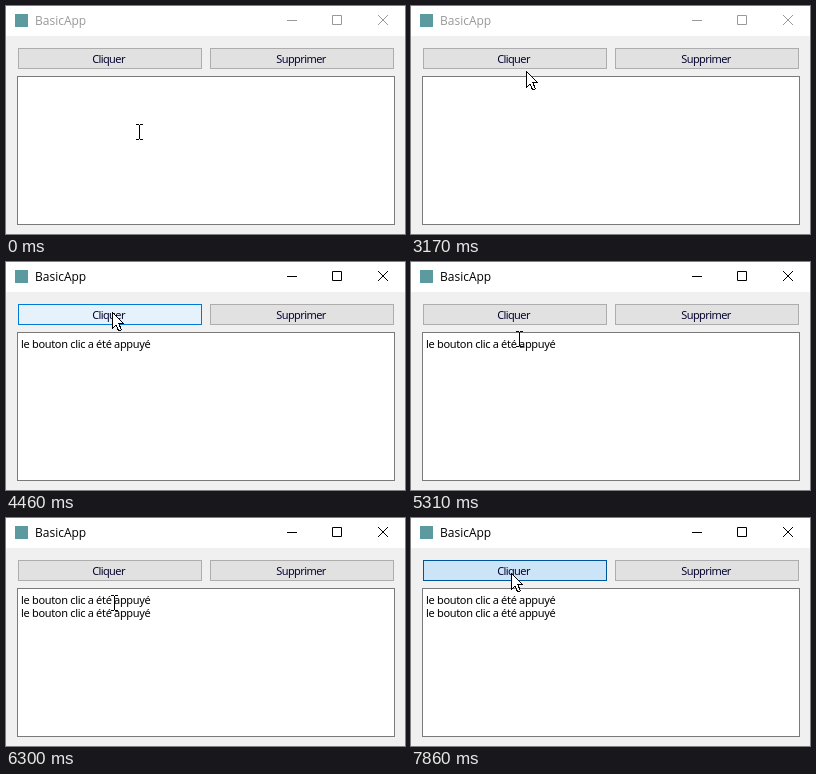
These frames come from a looping animation (399x228 px, 7990 ms). An HTML page:

```html
<!DOCTYPE html>
<html lang="fr">
<head>
<meta charset="utf-8">
<title>BasicApp</title>
<style>
  html, body { margin: 0; width: 100%; height: 100%; overflow: hidden; background: #f0f0f0; }
  svg { display: block; width: 399px; height: 228px; }
  text { font: 11px "Noto Sans", sans-serif; letter-spacing: -.32px; }
  .label { text-anchor: middle; letter-spacing: -.6px; fill: #060630; }
  #title { font: 12px "Open Sans", sans-serif; letter-spacing: 0; }
  .button { fill: #e1e1e1; stroke: #adadad; }
  .button.hover { fill: #e5f1fb; stroke: #0078d7; }
  .button.pressed { fill: #cce4f7; stroke: #005499; }
</style>
</head>
<body>
<svg viewBox="0 0 399 228">
  <rect width="399" height="228" fill="#f0f0f0"/>
  <rect width="399" height="30" fill="#fff"/>
  <rect x="9" y="8" width="13" height="13" fill="#5b9a9f"/>
  <text id="title" x="29" y="19">BasicApp</text>
  <g id="controls" fill="none" stroke-linejoin="bevel">
    <path d="M281 14.5h10M326.5 9.5h9v9h-9z"/>
    <path d="M372 9l10 10M382 9l-10 10"/>
  </g>

  <rect id="click" class="button" x="12.5" y="42.5" width="183" height="20"/>
  <text class="label" x="102.5" y="57">Cliquer</text>
  <rect class="button" x="204.5" y="42.5" width="183" height="20"/>
  <text class="label" x="295" y="57">Supprimer</text>

  <rect x="11.5" y="70.5" width="377" height="148" fill="#fff" stroke="#7a7a7a"/>
  <text class="line" x="15" y="86">le bouton clic a été appuyé</text>
  <text class="line" x="15" y="99">le bouton clic a été appuyé</text>

  <path id="beam" d="M-3 -7.5h3m1 0h3M.5 -7v14M-3 7.5h3m1 0h3" fill="none" stroke="#000"/>
  <path id="arrow" d="M.5 .5V16.5L4 13 6.5 18.5H8.5L9.2 17.5 6.8 11.5H11.5Z"
        fill="#fff" stroke="#000" shape-rendering="crispEdges"/>
</svg>
<script>
const LOOP = 7990, TICKS = 56;   // the screen refreshes about 7 times a second
const BUTTON_BOTTOM = 63, FIELD_TOP = 70;
const CLICKS = [30, 42, 55];     // ticks; each press lasts one tick

// Pointer strokes in ticks: start, end, and where the hot spot arrives
const HOME = { x: 133, y: 126 };
const STROKES = [
  [1, 2, 136, 126],
  [15, 16, 135, 120],
  [16, 22, 115, 65],
  [23, 26, 109, 58],
  [26, 28, 106, 50],
  [31, 32.6, 113, 100],
  [35, 39, 102, 54],
  [43, 44, 108, 85],
  [47, 51.5, 100, 55]
];

const $ = id => document.getElementById(id);
const lines = document.querySelectorAll('.line');
const show = (el, on) => el.setAttribute('visibility', on ? 'visible' : 'hidden');
const clamp = u => Math.min(1, Math.max(0, u));
const ease = u => u * u * (3 - 2 * u);

function pointerAt(tick) {
  let { x, y } = HOME;
  for (const [from, to, endX, endY] of STROKES) {
    const k = ease(clamp((tick - from) / (to - from)));
    x += (endX - x) * k;
    y += (endY - y) * k;
  }
  return { x: Math.round(x), y: Math.round(y) };
}

function draw(t) {
  const tick = Math.floor(t / LOOP * TICKS);
  const { x, y } = pointerAt(tick);
  const overField = y >= FIELD_TOP;
  const active = tick >= CLICKS[0];
  // The first click wakes the window without a pressed look
  const pressed = CLICKS.indexOf(tick) > 0;
  const state = pressed ? 'pressed' : y < BUTTON_BOTTOM ? 'hover' : '';
  const ink = active ? '#000' : '#999';

  $('title').setAttribute('fill', ink);
  $('controls').setAttribute('stroke', ink);
  $('click').setAttribute('class', 'button ' + state);
  lines.forEach((line, i) => show(line, tick > CLICKS[i]));
  show($('beam'), overField);
  show($('arrow'), !overField);
  $(overField ? 'beam' : 'arrow').setAttribute('transform', `translate(${x} ${y})`);
}

const start = performance.now();
function run() {
  draw((performance.now() - start) % LOOP);
  requestAnimationFrame(run);
}
run();
</script>
</body>
</html>
```
